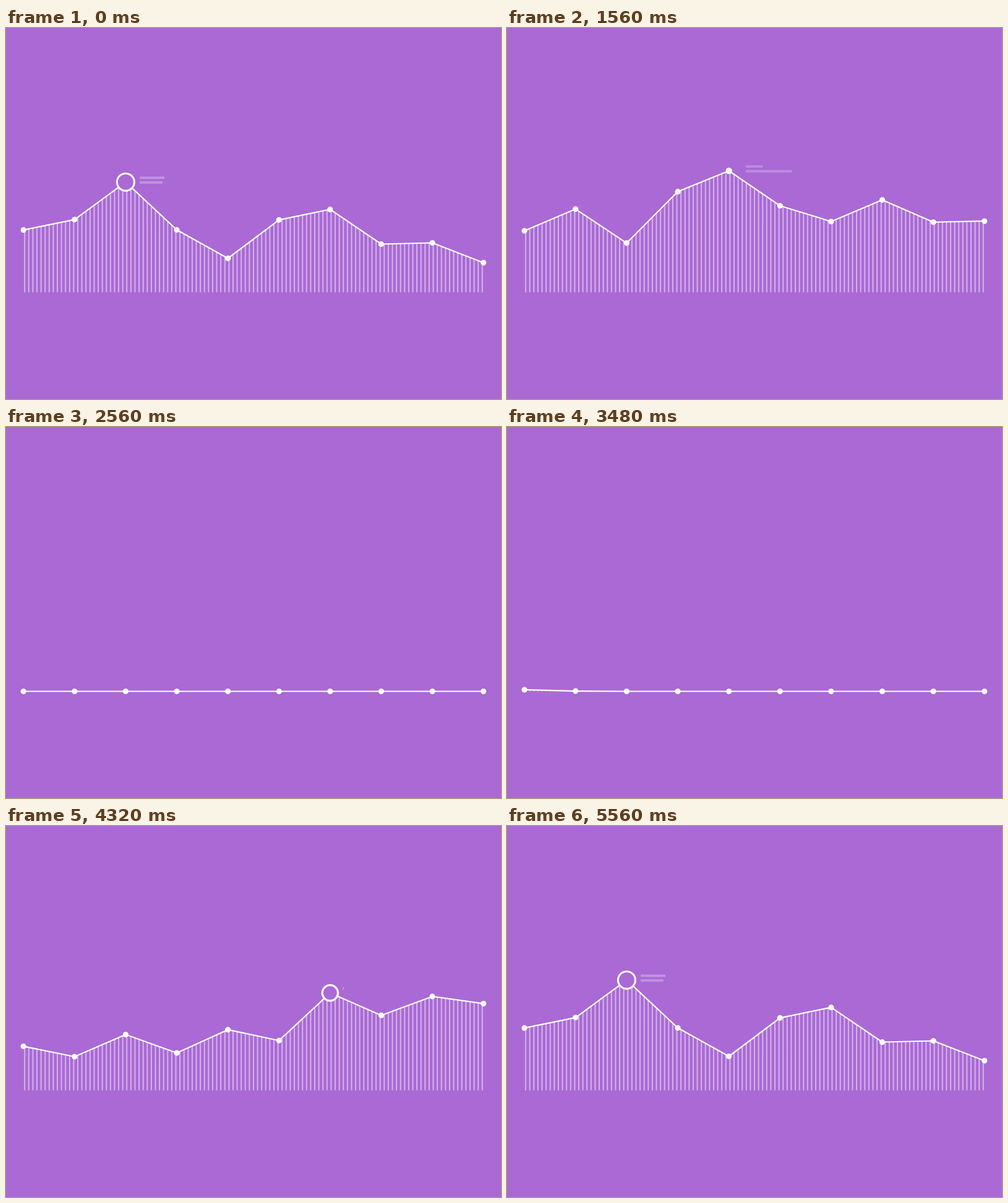
An HTML page for the animation above (5600 ms loop, 800 px wide and 600 px high).

```html
<!DOCTYPE html>
<html lang="en">
<head>
<meta charset="utf-8">
<title>Line chart</title>
<style>
  html, body { margin: 0; width: 100%; height: 100%; overflow: hidden; background: #aa69d5; }
  svg { display: block; width: 100vw; height: 100vh; }
</style>
</head>
<body>
<svg viewBox="0 0 800 600">
  <path id="bars" stroke="#fff" stroke-opacity=".5" stroke-width="2"/>
  <path id="line" fill="none" stroke="#fff" stroke-width="2.2" stroke-linejoin="round"/>
  <g id="dots" fill="#aa69d5" stroke="#fff"></g>
  <g id="labels" fill="#fff"></g>
</svg>
<script>
const LOOP = 5600, STEP = 40, BASE = 427.5, COUNT = 10, BARS = 113;
const $ = id => document.getElementById(id);
const clamp = v => Math.min(1, Math.max(0, v));
const mix = (a, b, p) => a + (b - a) * p;
const pointX = i => 28.2 + 82.61 * i;

const sineInOut = p => (1 - Math.cos(Math.PI * clamp(p))) / 2;
const cubicOut = p => 1 - (1 - clamp(p)) ** 3;
const smooth = p => (p = clamp(p)) * p * (3 - 2 * p);

// Cubic bezier with flat ends: handles (x1, 0) and (x2, 1).
const bezier = (x1, x2) => p => {
  if (p <= 0) return 0;
  if (p >= 1) return 1;
  let lo = 0, hi = 1;
  for (let n = 0; n < 24; n++) {
    const s = (lo + hi) / 2, r = 1 - s;
    if (3 * r * r * s * x1 + 3 * r * s * s * x2 + s ** 3 < p) lo = s; else hi = s;
  }
  return smooth(lo);
};
const rise = bezier(.84, .52), fall = bezier(.51, 0);

const flat = Array(COUNT).fill(BASE);
const early = [326.7, 309.8, 249.2, 326.5, 372.5, 310.3, 293.4, 349.5, 347.5, 379.6];
const middle = [288, 277.5, 345, 263.5, 231, 287.5, 313, 278, 314, 312.3];
const late = [356.3, 373, 337.3, 367, 329.4, 347, 270, 306.2, 275.7, 287.3];
const overshoot = (from, to, ratio) => to.map((y, i) => mix(from[i], y, ratio(i)));

const moves = [
  { start: 180, lag: 36, from: early, to: middle,
    over: [284, 272, 366, 250, 223, 268, 321.5, 276.4, 307, 303.5] },
  { start: 1360, lag: 50, from: middle, to: flat, drop: true },
  { start: 3400, lag: 40, from: flat, to: late, over: overshoot(flat, late, () => 1.11) },
  { start: 4620, lag: 40, from: late, to: early, over: overshoot(late, early, i => 1.05 + .006 * i) }
];

const marks = [
  { index: 4, open: 690, close: 1380, widths: [27.5, 74.5] },
  { index: 6, open: 4195, close: 4620, widths: [50, 32] },
  { index: 2, open: 5130, close: LOOP + 180, widths: [40, 37] }
];

function heightAt(i, time) {
  const move = moves.findLast(m => m.start <= time);
  if (!move) return early[i];
  const t = time - move.start - i * move.lag;
  if (move.drop) return mix(move.from[i], move.to[i], fall(t / 740));
  const top = mix(move.from[i], move.over[i], rise(t / 340));
  return mix(top, move.to[i], smooth((t - 340) / 220));
}

function add(parent, tag, attrs) {
  const node = document.createElementNS("http://www.w3.org/2000/svg", tag);
  set(node, attrs);
  return parent.appendChild(node);
}
function set(node, attrs) {
  for (const key in attrs) node.setAttribute(key, attrs[key]);
}

const dots = flat.map((_, i) => add($("dots"), "circle", { cx: pointX(i) }));
for (const mark of marks)
  mark.rows = mark.widths.map(() => add($("labels"), "rect", { height: 4 }));

function drawDot(i, y, open) {
  const radius = mix(4.6, 15.5, open);
  const stroke = Math.min(radius, mix(6, 3, open));
  set(dots[i], { cy: y, r: radius - stroke / 2, "stroke-width": stroke });
}

function drawMark(mark, time, ys) {
  const now = time < 1000 ? time + LOOP : time;
  const own = mark.close > LOOP ? now : time;
  const opened = own - mark.open, closed = own - mark.close;
  const y = ys[mark.index];
  drawDot(mark.index, y, sineInOut(opened / 160) * (1 - sineInOut(closed / 210)));

  const leave = clamp(closed / 330);
  mark.rows.forEach((row, n) => {
    const grown = cubicOut((opened - 120 - 50 * n) / 320);
    set(row, {
      x: pointX(mark.index) + mix(20, 22.6, grown) + 15 * leave ** 2,
      y: y - 9 + 7.6 * n,
      width: mark.widths[n] * grown,
      opacity: .27 * (1 - leave ** 3)
    });
  });
}

function draw(time) {
  const ys = flat.map((_, i) => heightAt(i, time));
  set($("line"), { d: "M" + ys.map((y, i) => `${pointX(i)} ${y}`).join("L") });

  let bars = "";
  for (let k = 0; k < BARS; k++) {
    const x = 30.2 + 6.603 * k;
    const place = (x - pointX(0)) / 82.61;
    const i = Math.min(COUNT - 2, Math.floor(place));
    const top = mix(ys[i], ys[i + 1], place - i);
    if (top < BASE - .5) bars += `M${x} ${top}V${BASE}`;
  }
  set($("bars"), { d: bars });

  ys.forEach((y, i) => drawDot(i, y, 0));
  marks.forEach(mark => drawMark(mark, time, ys));
}

const begin = performance.now();
function tick() {
  const time = Math.max(0, performance.now() - begin) % LOOP;
  draw(Math.floor(time / STEP) * STEP);
  requestAnimationFrame(tick);
}
tick();
</script>
</body>
</html>
```
